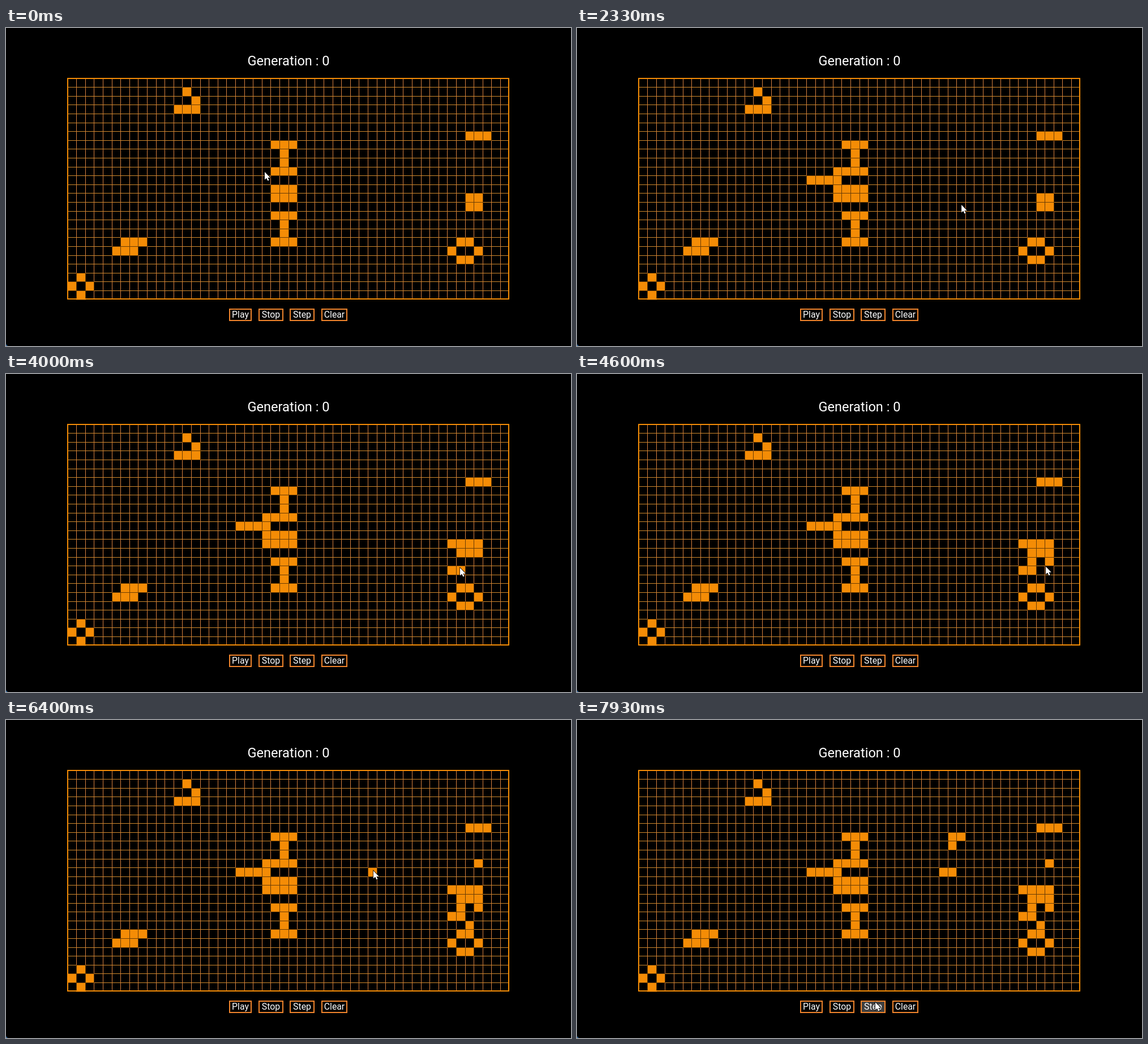
Write an HTML page with a canvas that moves like this. It is 998 by 561 pixels and loops after 8000 ms.

```html
<!DOCTYPE html>
<html lang="en">
<head>
<meta charset="utf-8">
<title>Game of Life</title>
<style>
html, body { margin: 0; width: 100%; height: 100%; overflow: hidden; background: #000; }
body { position: relative; color: #fff; font-family: Roboto, sans-serif; }
h1 { position: absolute; top: 44px; left: 0; width: 998px; margin: 0; text-align: center;
  font-size: 23.6px; line-height: 28px; font-weight: 400; }
button { position: absolute; top: 495px; height: 22px; padding: 0; box-sizing: border-box;
  border: 2px solid #f0842c; background: #000; color: #fff; font: 15.8px/18px Roboto, sans-serif; }
button.hover { background: #404040; }
canvas { position: absolute; left: 0; top: 0; }
</style>
</head>
<body>
<h1>Generation : 0</h1>
<button style="left:394px;width:40px">Play</button>
<button style="left:446px;width:44px">Stop</button>
<button style="left:501px;width:44px" id="step">Step</button>
<button style="left:557px;width:46px">Clear</button>
<canvas id="stage" width="998" height="561"></canvas>
<script>
const ctx = document.getElementById('stage').getContext('2d');
const stepButton = document.getElementById('step');
const LOOP = 8000, TICK = 1000 / 15, CELL = 15.6, LEFT = 109, TOP = 89, COLS = 50, ROWS = 25;
const ORANGE = '#f48c06';

// Starting patterns: column, row, rows of cells
const bar = ['###', '.#.', '.#.', '###'];
const patterns = [
  [12, 1, ['.#.', '..#', '###']],
  [45, 6, ['###']],
  [23, 7, [...bar, '...', '###', '###', '...', ...bar]],
  [45, 13, ['##', '##']],
  [43, 18, ['.##.', '#..#', '.##.']],
  [5, 18, ['.###', '###.']],
  [0, 22, ['.#.', '#.#', '.#.']]
];

// Pointer path: time, x, y
const path = [
  [0, 457, 254], [870, 457, 304], [1000, 424, 289], [1067, 397, 279], [1130, 388, 274],
  [1330, 411, 271], [1800, 441, 268], [1930, 428, 268], [2070, 428, 268],
  [2333, 679, 312], [2530, 763, 307], [2870, 788, 298], [3000, 788, 298],
  [3330, 803, 309], [3530, 788, 345], [3670, 788, 345], [4000, 802, 342],
  [4130, 802, 331], [4470, 834, 328], [4800, 819, 358], [4930, 819, 358],
  [5270, 835, 247], [5400, 835, 247], [5530, 790, 237], [5870, 582, 294],
  [6200, 649, 266], [6400, 649, 266], [6670, 665, 266], [7000, 665, 215],
  [7200, 666, 207], [7330, 682, 206], [7470, 682, 206], [7730, 570, 430], [7930, 527, 498]
];

// Each click fills the cell under the pointer
const clicks = [70, 330, 530, 800, 1470, 1800, 2070, 3000, 3200, 3330, 3670,
  3930, 4130, 4470, 4870, 5400, 6270, 6600, 7000, 7200, 7470];

const gridX = col => Math.floor(LEFT + col * CELL + 1e-6);
const gridY = row => Math.floor(TOP + row * CELL + 1e-6);

function pointerAt(t) {
  const i = path.findIndex(p => p[0] > t);
  if (i < 0) return path[path.length - 1].slice(1);
  const [t0, x0, y0] = path[i - 1], [t1, x1, y1] = path[i];
  const k = (t - t0) / (t1 - t0);
  return [x0 + (x1 - x0) * k, y0 + (y1 - y0) * k];
}

function fillCell(col, row) {
  const x = gridX(col), y = gridY(row), w = gridX(col + 1) - x, h = gridY(row + 1) - y;
  ctx.fillStyle = '#6b3d05';
  ctx.fillRect(x, y, w + 1, h + 1);
  ctx.fillStyle = ORANGE;
  ctx.fillRect(x + 1, y + 1, w - 1, h - 1);
}

function drawGrid() {
  ctx.fillStyle = '#d9813f';
  for (let col = 1; col < COLS; col++) ctx.fillRect(gridX(col), TOP, 1, ROWS * CELL);
  ctx.fillStyle = '#cf882c';
  for (let row = 1; row < ROWS; row++) ctx.fillRect(LEFT, gridY(row), COLS * CELL, 1);
}

function drawCells(t) {
  for (const [col, row, lines] of patterns)
    lines.forEach((line, j) => [...line].forEach((c, i) => c === '#' && fillCell(col + i, row + j)));
  for (const time of clicks) {
    if (t < time - 4) break;
    const [x, y] = pointerAt(time);
    fillCell(Math.floor((x - LEFT) / CELL), Math.floor((y - TOP) / CELL));
  }
}

const arrow = new Path2D('M0 0V13.5L3.2 10.7 5.4 15.6 7.6 14.6 5.4 9.9H9.6Z');

function drawPointer(x, y) {
  ctx.save();
  ctx.translate(x, y);
  ctx.strokeStyle = '#000';
  ctx.lineWidth = 1.4;
  ctx.stroke(arrow);
  ctx.fillStyle = '#fff';
  ctx.fill(arrow);
  ctx.restore();
}

function drawCorner() {
  ctx.fillStyle = '#3674b5';
  ctx.beginPath();
  ctx.moveTo(0, 556);
  ctx.quadraticCurveTo(0, 561, 5, 561);
  ctx.lineTo(0, 561);
  ctx.fill();
}

function frame(now) {
  const t = Math.floor((now % LOOP + 4) / TICK) * TICK % LOOP;
  const [x, y] = pointerAt(t);
  ctx.clearRect(0, 0, 998, 561);
  drawGrid();
  drawCells(t);
  ctx.strokeStyle = ORANGE;
  ctx.lineWidth = 2;
  ctx.strokeRect(LEFT, TOP, COLS * CELL - 1, ROWS * CELL - 1);
  drawCorner();
  drawPointer(x, y);
  stepButton.classList.toggle('hover', x > 501 && x < 545 && y > 495 && y < 517);
  requestAnimationFrame(frame);
}
requestAnimationFrame(frame);
</script>
</body>
</html>
```
